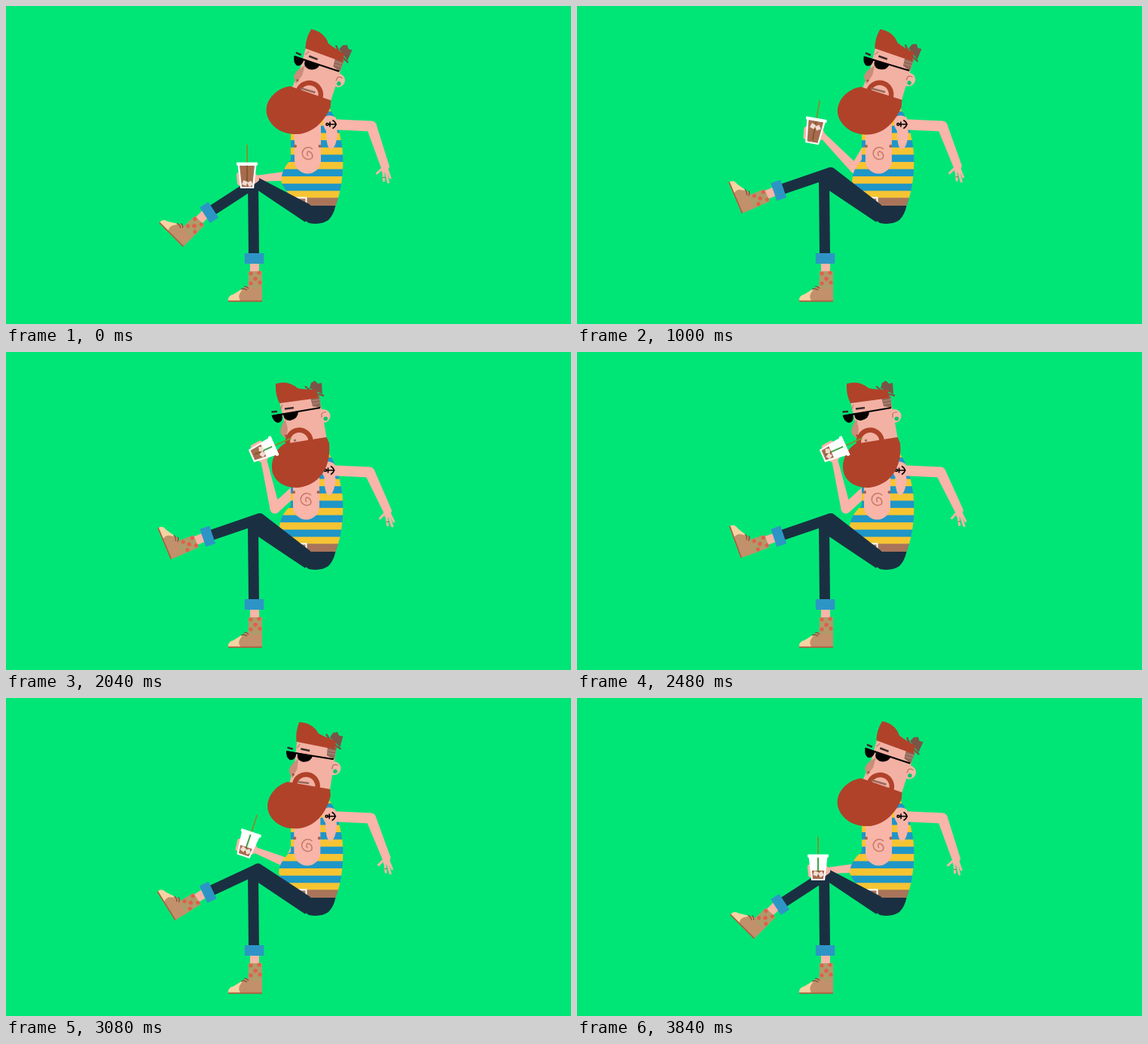
Recreate the animation shown at these times as an HTML page. Size 750 by 422 pixels, loop 3880 ms.

```html
<!DOCTYPE html>
<html lang="en">
<head>
<meta charset="utf-8">
<title>Iced coffee break</title>
<style>
  html, body { margin: 0; width: 100%; height: 100%; overflow: hidden; background: #00e676; }
  svg { display: block; width: 100vw; height: 100vh; }
  .skin { fill: #f8b5a8; }
  .skinLine { fill: none; stroke: #f8b5a8; stroke-linecap: round; stroke-linejoin: round; }
  .pants { fill: #1a3042; stroke: #1a3042; stroke-width: 14; stroke-linejoin: round; }
  .cuff { fill: #2d95c6; }
  .hair { fill: #b0422a; }
  .ink { fill: none; stroke: #000; }
</style>
</head>
<body>
<svg viewBox="0 0 750 422">
  <defs>
    <pattern id="stripes" y="168.500" width="750" height="19.200" patternUnits="userSpaceOnUse">
      <rect width="750" height="19.200" fill="#1f96c8"/>
      <rect width="750" height="9.600" fill="#f6c432"/>
    </pattern>
    <clipPath id="inside"><path d="M-10-13.500H10L7 15H-7Z"/></clipPath>
    <!-- origin at the ankle -->
    <g id="foot">
      <rect class="skin" x="-6" y="-8" width="12" height="16"/>
      <path d="M-8 6H10V34H-9Z" fill="#af9a6b"/>
      <g fill="#e0604a">
        <circle cx="-5" cy="9" r="2.600"/><circle cx="6" cy="8" r="2.600"/><circle cx="1" cy="16" r="2.800"/>
        <circle cx="-5" cy="22" r="2.600"/><circle cx="7" cy="21" r="2.600"/>
      </g>
      <path d="M-35 45Q-36 38.500-28 36.500L-16 29L-14 45Z" fill="#f6d3a2"/>
      <path d="M-18 33Q-14 25-9 26L1 30L10 26V45H-19Q-23 39-18 33Z" fill="#c2906a"/>
      <path d="M-18 30Q-14 28-10 31M-14 26Q-10 26-8 29" fill="none" stroke="#7b4a35" stroke-width="1.200"/>
      <path d="M-35 45.600H10" stroke="#b8583e" stroke-width="1.600"/>
    </g>
  </defs>

  <rect width="750" height="422" fill="#00e676"/>

  <path id="upperArm" class="skinLine" stroke-width="13"/>
  <path id="forearm" class="skin"/>

  <path id="torso" fill="url(#stripes)"/>
  <path d="M384 254.500H441L437 266H392Z" fill="#a9745a"/>
  <rect x="385" y="254.500" width="13.500" height="9" fill="#a9745a" stroke="#fff" stroke-width="2"/>

  <g id="chest">
    <path class="skin" d="M383 145V205a17.500 17.500 0 0 0 35 0V145Z"/>
    <circle cx="384" cy="186" r="2" fill="#a5604f"/>
    <circle cx="416.500" cy="186" r="2" fill="#a5604f"/>
    <path d="M407 190a8 8 0 1 0-1 12a6 6 0 0 0-5-9a4 4 0 0 0 0 6" fill="none" stroke="#c57a68" stroke-width="1.500"/>
  </g>

  <g id="rightArm">
    <path class="skin" d="M423 147Q418 157 425 166Q425 190 432 190Q438 188 440 170L438 148Q430 143 423 147Z"/>
    <path class="skin" d="M430 150L485 152.500V166.500L432 164Z"/>
    <g class="ink" stroke-width="1.600">
      <circle cx="426.500" cy="157" r="1.500"/>
      <path d="M428 157H439M430 153.500V160.500M433.500 151.500Q442 157 433.500 162.500"/>
    </g>
    <g id="rightForearm">
      <circle class="skin" cx="485" cy="159.500" r="7"/>
      <path class="skin" d="M491.500 157L509 213L506 221L499 221L498 215L479 163Z"/>
      <path class="skinLine" stroke-width="3" d="M499 216L492.500 222M501 219L501.500 232M504 219L507.500 234M506 217L510 228"/>
      <path d="M500 227.500H503.500" stroke="#8d6a5c"/>
    </g>
  </g>

  <g id="head">
    <path d="M403 48L405 41L410 38L414 42L419 41L420 56Z" fill="#795548"/>
    <path d="M397 45.500Q407 55 422 58" fill="none" stroke="#795548" stroke-width="2.400"/>
    <circle class="skin" cx="421.500" cy="85" r="9"/>
    <path class="skin" d="M363 66L416 60L426 116L372 123L369 92Z" style="fill:#f2b1a2"/>
    <path d="M404 60L416 58L418 74L407 72Z" fill="#8f6a5b"/>
    <path d="M406 65L417 63M407 69L417 67" stroke="#b98a7a"/>
    <path class="hair" d="M358 42Q375 37 387 48Q398 50 412 50L415 61L363 68Q357 56 358 42Z"/>
    <path d="M419 82Q421 79 425 80M419 82V87" fill="none" stroke="#b5705f" stroke-width="1.200"/>
    <circle cx="424.300" cy="88.500" r="2.800" fill="#0bc76f"/>
    <path class="ink" stroke-width="2" d="M355 84.600L417 74"/>
    <g id="features">
      <path d="M371 89Q362 102 365 109L372 116L374 102Z" fill="#cb8d7a"/>
      <circle cx="371.500" cy="111" r="1.500" fill="#a0523d"/>
      <path d="M352.500 79.500L360 79M370 75.500L382 74" stroke="#3a2b2c" stroke-width="2.600"/>
      <path d="M367 70L364.500 76" stroke="#b5705f"/>
      <path d="M352.500 84L388 78.500Q388 89 377 91Q369 91 368 83L366.500 83.500Q368 93 361 94Q355 93 352.500 84Z"/>
    </g>
    <path id="moustache" d="M374 123V121A15 15 0 1 1 404.500 117" fill="none" stroke="#b0422a" stroke-width="6.500"/>
    <path class="hair" d="M369 122C355 132 349.500 150 355 163C360.500 176 376 181 388 180C413 177 432 157 429 121L425.500 113Z"/>
    <path id="mouth" stroke="#96695c" stroke-width="2.600"/>
  </g>

  <!-- standing leg -->
  <use href="#foot" x="330" y="346"/>
  <path class="pants" style="fill:none" stroke-width="13" d="M401 281L328 232L329 330"/>
  <rect class="cuff" x="316.800" y="328" width="25.400" height="14" rx="1"/>
  <path d="M388 262L400 265H437.500Q435 277 428 284Q418 291 402 288L385 276Z" fill="#1a3042"/>

  <!-- crossed leg -->
  <g id="shin">
    <use id="tapFoot" href="#foot"/>
    <path class="pants" d="M0 0V70"/>
    <rect class="cuff" x="-12.500" y="66.500" width="25" height="13.500" rx="1"/>
  </g>
  <path id="thigh" class="pants"/>

  <g id="cup">
    <path class="skinLine" stroke-width="6" d="M-11-1L-10 10M13 4L9-1M13 5L9 8"/>
    <path d="M-12.500-14.500H12.500L9 17H-9Z" fill="#fff"/>
    <path d="M0-41V-17" stroke="#7d932b" stroke-width="1.800"/>
    <g clip-path="url(#inside)">
      <path d="M0-17V12" stroke="#3fa548" stroke-width="2"/>
      <path id="coffee" fill="#934623" fill-opacity=".8"/>
      <g id="ice" fill="#fbe9e2" fill-opacity=".9">
        <rect x="-6" y="-3" width="6" height="6" transform="rotate(20 -3 0)"/>
        <rect x="1" y="-2" width="6" height="6" transform="rotate(-32 4 1)"/>
      </g>
    </g>
    <rect x="-14" y="-17.500" width="28" height="4" rx="1" fill="#fff"/>
  </g>
</svg>

<script>
const LOOP = 3880;
const el = id => document.getElementById(id);
const set = (id, name, value) => el(id).setAttribute(name, value);
const rad = Math.PI / 180;

// Smooth curve through [time, ...values]; it rests at both ends and on holds.
function track(t, keys) {
  const last = keys.length - 1;
  if (t <= keys[0][0]) return keys[0].slice(1);
  if (t >= keys[last][0]) return keys[last].slice(1);
  const i = keys.findIndex(k => k[0] > t) - 1;
  const a = keys[i], b = keys[i + 1], span = b[0] - a[0], u = (t - a[0]) / span;
  const slope = (n, j) => {
    if (n === 0 || n === last) return 0;
    const p = keys[n - 1], k = keys[n], q = keys[n + 1];
    return p[j] === k[j] || k[j] === q[j] ? 0 : (q[j] - p[j]) / (q[0] - p[0]) * span;
  };
  return a.slice(1).map((v, n) => {
    const j = n + 1, s = u * u * (3 - 2 * u);
    return v + (b[j] - v) * s + u * (1 - u) * ((1 - u) * slope(i, j) - u * slope(i + 1, j));
  });
}

function taper(x1, y1, w1, x2, y2, w2) {
  const len = Math.hypot(x2 - x1, y2 - y1), nx = (y1 - y2) / len / 2, ny = (x2 - x1) / len / 2;
  return `M${x1 + nx * w1} ${y1 + ny * w1}L${x2 + nx * w2} ${y2 + ny * w2}` +
         `L${x2 - nx * w2} ${y2 - ny * w2}L${x1 - nx * w1} ${y1 - ny * w1}Z`;
}

// cup x, y, angle, then elbow x, y
const REST = [320, 225, 0, 380, 225], SIP = [341, 131, 66, 357, 208];
const ARM = [[580, ...REST], [1000, 315, 166, 10, 369, 216], [1500, ...SIP],
             [2580, ...SIP], [2840, 324, 151, 46, 369, 213], [3340, ...REST]];
// knee x, y, shin angle, foot angle, raise
const LOW = [331, 234, 56.9, 45, 0], HIGH = [337, 221, 71.2, 67, 1];
const LEG = [[580, ...LOW], [980, ...HIGH], [2860, ...HIGH], [3340, ...LOW]];
const TILT = [[920, 1], [1480, 0], [2660, 0], [3340, 1]];
const LEVEL = [[1400, -13.5], [2040, -1], [2600, 4]];
const ICE = [[100, 10], [900, -6], [1450, -6], [2600, 8]];

function draw(t) {
  const [cx, cy, angle, ex, ey] = track(t, ARM);
  const [kx, ky, shin, foot, raise] = track(t, LEG);
  const [tilt] = track(t, TILT), [level] = track(t, LEVEL), [ice] = track(t, ICE);
  const sway = (1 - Math.cos(t / LOOP * 8 * Math.PI)) / 2;
  const lean = 1 - tilt, c = Math.cos(angle * rad), s = Math.sin(angle * rad);

  set('cup', 'transform', `translate(${cx} ${cy}) rotate(${angle})`);
  set('coffee', 'd', `M-12 ${level}H12V18H-12Z`);
  set('ice', 'transform', `translate(0 ${ice})`);
  set('upperArm', 'd', `M394 174L${ex} ${ey}`);
  set('forearm', 'd', taper(ex, ey, 13, cx + 12 * c - 4 * s, cy + 12 * s + 4 * c, 8));

  set('head', 'transform', `rotate(${28 * tilt} 404 131)`);
  set('features', 'transform', `translate(${2.2 * tilt} ${-0.6 * tilt})`);
  set('moustache', 'transform', `translate(${7 * tilt} ${0.7 * tilt})`);
  set('mouth', 'd', `M382 117.700L${385 + 17 * tilt} ${117 - 3.4 * tilt}`);
  set('chest', 'transform', `translate(${-2 * lean} 0)`);
  const belly = 365 - 3 * (level + 13.5) / 17.5;
  set('torso', 'd', `M378 160V204Q${belly + 1} 216 ${belly} 232Q${belly + 3} 244 385 258L398 266H437` +
                    'C448 240 450 200 444 175Q440 150 428 134L410 140Z');
  set('rightArm', 'transform', `translate(${-2.5 * lean} 0)`);
  set('rightForearm', 'transform', `rotate(${-2 * raise - 4 * lean - sway} 485 159)`);

  set('thigh', 'd', `M${kx} ${ky}L399 269L328 232Z`);
  set('shin', 'transform', `translate(${kx} ${ky}) rotate(${shin})`);
  set('tapFoot', 'transform', `translate(0 84) rotate(${foot - shin + 3 * sway})`);
}

function frame() {
  draw(performance.now() % LOOP);
  requestAnimationFrame(frame);
}
frame();
</script>
</body>
</html>
```
